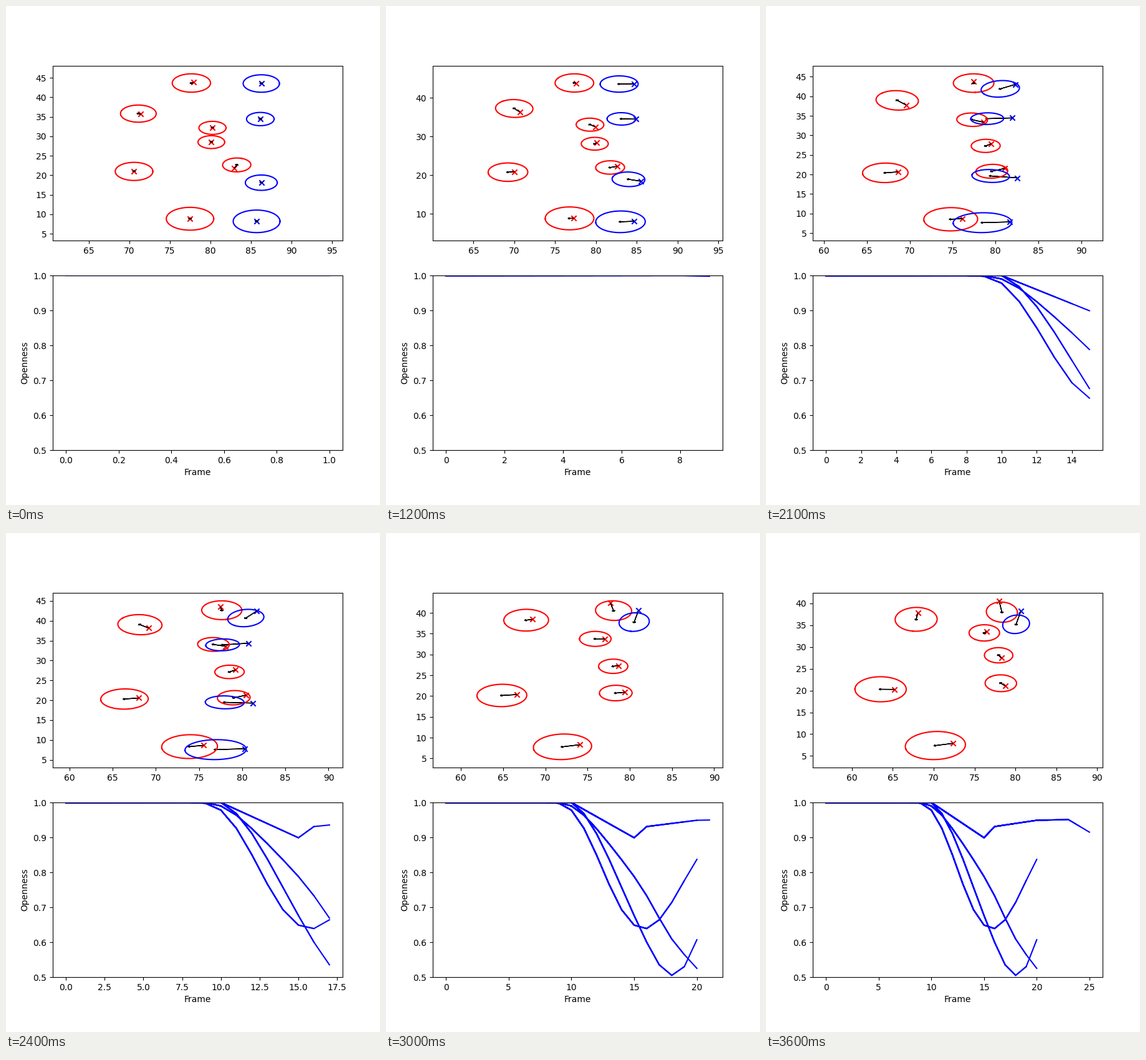
Animation of 600x800 px, one loop 3750 ms. Source, as a matplotlib script:

```python
import numpy as np
import matplotlib.pyplot as plt
from matplotlib.animation import FuncAnimation

FRAMES, INTERVAL = 25, 150
STEP = 8          # frames between the key points of a path
LOOKAHEAD = 5     # the arrow shows the displacement over this many frames
LEAVE = 20        # frame at which most of the blue team is gone
SIDE_PAD = 8.4
THETA = np.linspace(0, 2 * np.pi, 100)


def spline(t, points, step, slope_in, slope_out):
    """Value and slope at t of a clamped cubic spline with even knots."""
    p = np.asarray(points, float)
    n = len(p)
    matrix = 4 * np.eye(n) + np.eye(n, k=1) + np.eye(n, k=-1)
    matrix[0], matrix[-1] = np.eye(n)[0], np.eye(n)[-1]
    rhs = np.zeros_like(p)
    rhs[0], rhs[-1] = slope_in, slope_out
    rhs[1:-1] = 3 * (p[2:] - p[:-2]) / step
    m = np.linalg.solve(matrix, rhs)

    i = min(int(t // step), n - 2)
    u = t / step - i
    rise = p[i + 1] - p[i]
    value = (p[i] + (3 * u**2 - 2 * u**3) * rise
             + step * u * (1 - u) * ((1 - u) * m[i] - u * m[i + 1]))
    slope = (6 * u * (1 - u) * rise / step + (1 - u) * (1 - 3 * u) * m[i]
             + u * (3 * u - 2) * m[i + 1])
    return value, slope


class Player:
    """A path through key points; the leads are its first and last arrows."""

    def __init__(self, color, path, lead_out, lead_in=(0, 0), last=FRAMES):
        self.color, self.path, self.last = color, path, last
        self.slopes = np.array([lead_in, lead_out]) / LOOKAHEAD

    def state(self, k):
        pos, speed = spline(k, self.path, STEP, *self.slopes)
        return pos, speed * LOOKAHEAD


players = [
    Player("r", [(77.93, 43.81), (77.55, 43.74), (77.46, 43.5), (78.01, 40.6)],
           (.34, -2.6), lead_in=(-.29, -.16)),
    Player("r", [(71.41, 35.67), (70.71, 36.3), (69.17, 38.18), (68.07, 37.8)],
           (-.21, -1.45), lead_in=(-.31, .13)),
    Player("r", [(80.24, 32.15), (79.93, 32.5), (78.08, 33.57), (76.45, 33.6)],
           (-.25, -.36)),
    Player("r", [(80.1, 28.5), (80.08, 28.39), (79.24, 27.64), (78.28, 27.48)],
           (-.33, .62)),
    Player("r", [(70.57, 20.99), (70.02, 20.89), (68.0, 20.56), (65.22, 20.27)],
           (-1.71, .03)),
    Player("r", [(82.92, 21.77), (82.6, 22.26), (80.47, 21.27), (78.77, 21.06)],
           (-.55, .62), lead_in=(.31, .88)),
    Player("r", [(77.47, 8.85), (77.26, 8.82), (75.54, 8.63), (72.37, 7.88)],
           (-2.16, -.5)),
    Player("b", [(86.26, 43.52), (84.66, 43.62), (81.7, 42.46), (80.66, 38.21)],
           (-.57, -3.0)),
    Player("b", [(86.14, 34.41), (84.89, 34.47), (80.76, 34.35), (76.0, 33.3)],
           (-2.8, -.6), last=LEAVE),
    Player("b", [(86.26, 18.1), (85.5, 18.41), (81.27, 19.27), (75.8, 19.2)],
           (-3.5, .2), last=LEAVE),
    Player("b", [(85.68, 8.19), (84.66, 8.05), (80.33, 7.78), (74.7, 7.4)],
           (-3.4, -.2), last=LEAVE),
]


def reach(pos, k):
    """Radius of a player's zone: it grows with the distance to the ball."""
    ball = np.array([84, 29]) + np.array([1, .5]) * k / (FRAMES - 1)
    return 1.6 + 0.00295 * np.sum((pos - ball) ** 2)


def zone(pos, lead, radius):
    """Ellipse around the arrow's end, stretched along the movement."""
    stretch = 0.0148 * (lead @ lead)
    angle = np.arctan2(lead[1], lead[0])
    c, s = np.cos(angle), np.sin(angle)
    along = radius * (1 + stretch) * np.cos(THETA)
    across = radius * (1 - stretch) * np.sin(THETA)
    x, y = pos + lead
    return x + along * c - across * s, y + along * s + across * c


def dip(values, slope_out):
    """Openness from sample 8 to 20 through a value at every second sample."""
    tail = [spline(n, values, 2, 0, slope_out)[0] for n in range(13)]
    return np.minimum(1, np.r_[np.ones(8), tail])


openness = [
    np.interp(np.arange(26), [10, 15, 16, 20, 23, 25],
              [1, .899, .931, .949, .951, .915]),
    dip([1, .990, .925, .836, .733, .609, .525], -.042),
    dip([1, .978, .850, .693, .639, .714, .837], .055),
    dip([1, 1, .911, .757, .600, .505, .607], .1),
]

fig, (pitch, chart) = plt.subplots(2, 1, figsize=(6, 8), dpi=100)


def padded(low, high):
    margin = 0.05 * (high - low)
    return low - margin, high + margin


def draw_pitch(k):
    pitch.clear()
    xs, ys = [], []
    for p in players:
        if k >= p.last:
            continue
        pos, lead = p.state(k)
        ex, ey = zone(pos, lead, reach(pos, k))
        pitch.scatter(*pos, c=p.color, marker="x")
        pitch.plot(ex, ey, color=p.color)
        pitch.arrow(*pos, *lead, head_width=0.4, head_length=0.2, color="k")
        xs.append(pos[0])
        ys += [pos[1], ey.min(), ey.max()]
    pitch.set_xlim(padded(min(xs) - SIDE_PAD, max(xs) + SIDE_PAD))
    pitch.set_ylim(padded(min(ys), max(ys)))


def draw_chart(k):
    chart.clear()
    # Every earlier curve stays, so older segments grow denser.
    for n in range(1, k + 2):
        for values in openness:
            if n < len(values):
                chart.plot(np.arange(n + 1), values[:n + 1], color="b")
    chart.set_ylim(0.5, 1.0)
    chart.set_xlabel("Frame")
    chart.set_ylabel("Openness")


def update(k):
    draw_pitch(k)
    draw_chart(k)
    return []


anim = FuncAnimation(fig, update, frames=FRAMES, interval=INTERVAL,
                     init_func=lambda: [], repeat=True, repeat_delay=0)
plt.show()
```
